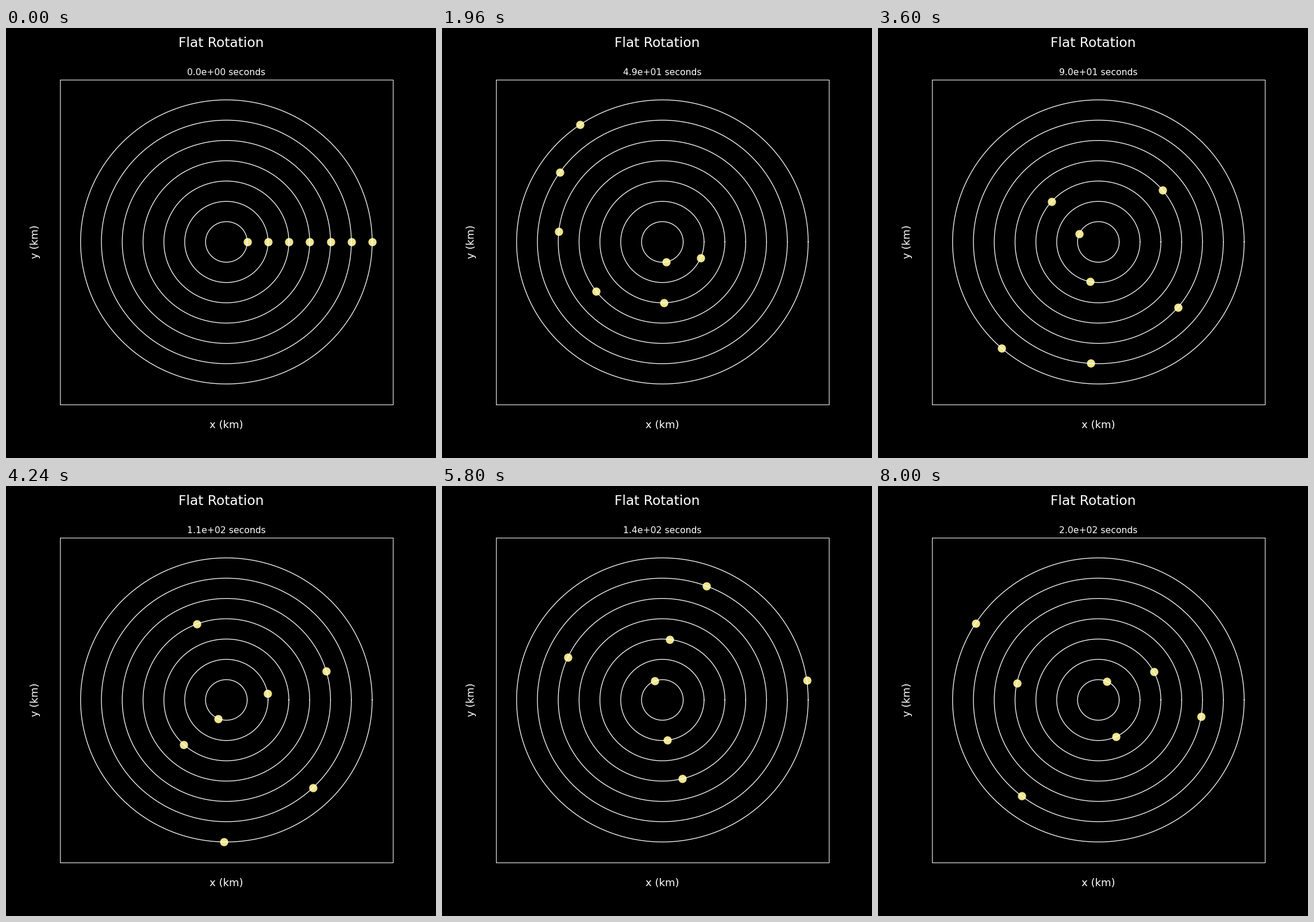
Recreate the animation shown at these times as a matplotlib script. Size 748x748 px, loop 8.04 s.

```python
import numpy as np
import matplotlib.pyplot as plt
from matplotlib.animation import FuncAnimation

plt.rcParams.update({
    "font.family": "DejaVu Sans",
    "text.color": "white",
    "axes.labelcolor": "white",
    "axes.edgecolor": "white",
    "axes.facecolor": "black",
    "figure.facecolor": "black",
})

STEPS = 201
radii = np.arange(1, 8)
speeds = np.array([0.10, 0.24, 0.29, 0.31, 0.31, 0.31, 0.31])
omega = speeds / radii

fig, ax = plt.subplots(figsize=(8, 8), dpi=93.5)
fig.subplots_adjust(left=0.125, right=0.9, bottom=0.125, top=0.88)
fig.suptitle("Flat Rotation", fontsize=18)
ax.set(xlim=(-8, 8), ylim=(-8, 8))
ax.set_xlabel("x (km)", fontsize=14)
ax.set_ylabel("y (km)", fontsize=14)
# Invisible ticks still reserve the space next to the axis labels
ax.tick_params(color="none", labelcolor="none")
clock = ax.set_title("", fontsize=12)

stars, = ax.plot([], [], "o", color="khaki", markersize=10)
phi = np.linspace(0, 2 * np.pi, 361)
for r in radii:
    ax.plot(r * np.cos(phi), r * np.sin(phi), color="white", lw=1)


def update(t):
    angle = omega * t
    stars.set_data(radii * np.cos(angle), radii * np.sin(angle))
    clock.set_text(f"{t:.1e} seconds")
    return stars, clock


anim = FuncAnimation(fig, update, frames=STEPS, interval=40,
                     repeat=True, repeat_delay=0)
plt.show()
```
